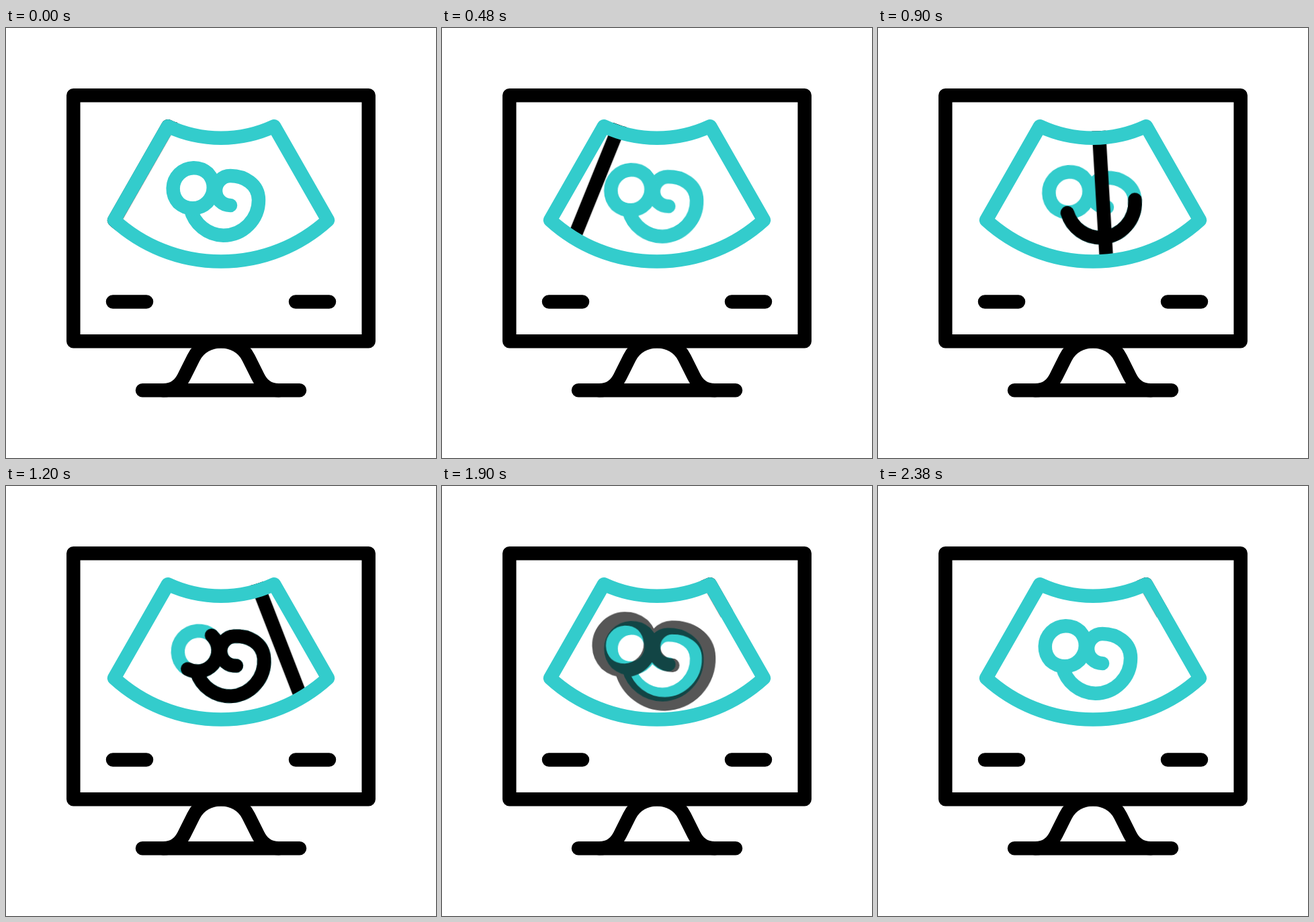
Recreate the animation shown at these times as an HTML page. Size 640 by 640 pixels, loop 2.4 s.

```html
<!DOCTYPE html>
<html lang="en">
<head>
<meta charset="utf-8">
<title>Ultrasound monitor</title>
<style>
  @property --s { syntax: '<number>'; inherits: true; initial-value: 1; }

  html, body { margin: 0; width: 100%; height: 100%; overflow: hidden; background: #fff; }
  svg { display: block; width: 100vw; height: 100vh; }

  .ink { fill: none; stroke: #000; stroke-width: 20.5px; stroke-linecap: round; stroke-linejoin: round; }
  .teal { stroke: #3cc; }

  .baby, .echo, .scan, .scan line, .body, .head {
    animation-duration: 2400ms;
    animation-iteration-count: infinite;
    animation-timing-function: linear;
  }

  /* gentle drift and back */
  .baby {
    transform-origin: 312px 258px;
    animation-name: drift;
    animation-timing-function: cubic-bezier(.333, .167, .667, .833);
  }
  @keyframes drift {
    0%, 100% { transform: translate(0, 0) rotate(0deg); }
    50% { transform: translate(8.4px, 5.1px) rotate(-4deg); }
  }

  /* black outline: drawn, then expands at constant line weight and fades */
  .echo {
    transform-origin: 312px 258px;
    transform: scale(var(--s));
    stroke-width: calc(20.5px / var(--s));
    animation-name: grow, fade;
  }
  @keyframes grow {
    0%, 58.333% { --s: 1; }
    95.833%, 100% { --s: 1.5; }
  }
  @keyframes fade {
    0%, 70.833% { opacity: 1; }
    95.833%, 100% { opacity: 0; }
  }

  .body, .head { stroke-dasharray: 1 3; }
  .body { animation-name: draw-body; }
  .head { animation-name: draw-head; }
  @keyframes draw-body {
    0%, 26.667% { stroke-dashoffset: 1.01; }
    46.667%, 100% { stroke-dashoffset: 0; }
  }
  @keyframes draw-head {
    0%, 43.333% { stroke-dashoffset: 1.01; }
    57.5%, 100% { stroke-dashoffset: 0; }
  }

  .scan {
    transform-origin: 320px 7.75px;
    animation-name: sweep;
    animation-timing-function: cubic-bezier(.333, 0, .667, 1);
  }
  @keyframes sweep {
    0%, 7.5% { transform: rotate(29.74deg); }
    63.333%, 100% { transform: rotate(-29.74deg); }
  }
  .scan line { stroke-linecap: butt; stroke-dasharray: 202 400; animation-name: retract; }
  @keyframes retract {
    0%, 65% { stroke-dashoffset: 0; }
    78%, 100% { stroke-dashoffset: 122; }
  }
</style>
</head>
<body>
<svg viewBox="0 0 640 640">
  <defs>
    <path id="fan" d="M241 146.2A187 187 0 0 0 399 146.2L479 286A236 236 0 0 1 161 286Z"/>
    <path id="body" pathLength="1" d="M274.5 269A51.5 52.5 0 0 0 323.5 308.7A52.5 52.5 0 0 0 376 256C376 232 354 220 334 220A22 22 0 0 0 334 264"/>
    <path id="head" pathLength="1" d="M300.6 216.4A31 31 0 0 1 256.8 260.2A31 31 0 0 1 300.6 216.4"/>
    <mask id="sector" maskUnits="userSpaceOnUse" x="0" y="0" width="640" height="640">
      <use href="#fan" fill="#fff" stroke="#fff" stroke-width="20.5" stroke-linejoin="round"/>
    </mask>
  </defs>

  <g class="ink">
    <path d="M100.3 100.3H539.7V466.3H100.3Z"/>
    <path d="M159 407.5H209M431 407.5H481M203 539.3H437"/>
    <path d="M234 539.3C250 539.3 259 531 265 519L279 491C295 458 345 458 361 491L375 519C381 531 390 539.3 406 539.3"/>
  </g>

  <g class="baby">
    <g class="ink teal">
      <use href="#body"/>
      <use href="#head"/>
    </g>
    <g class="ink echo">
      <use href="#body" class="body"/>
      <use href="#head" class="head"/>
    </g>
  </g>

  <g mask="url(#sector)">
    <g class="ink scan"><line x1="320" y1="138" x2="320" y2="340"/></g>
  </g>
  <use href="#fan" class="ink teal"/>
</svg>
</body>
</html>
```
